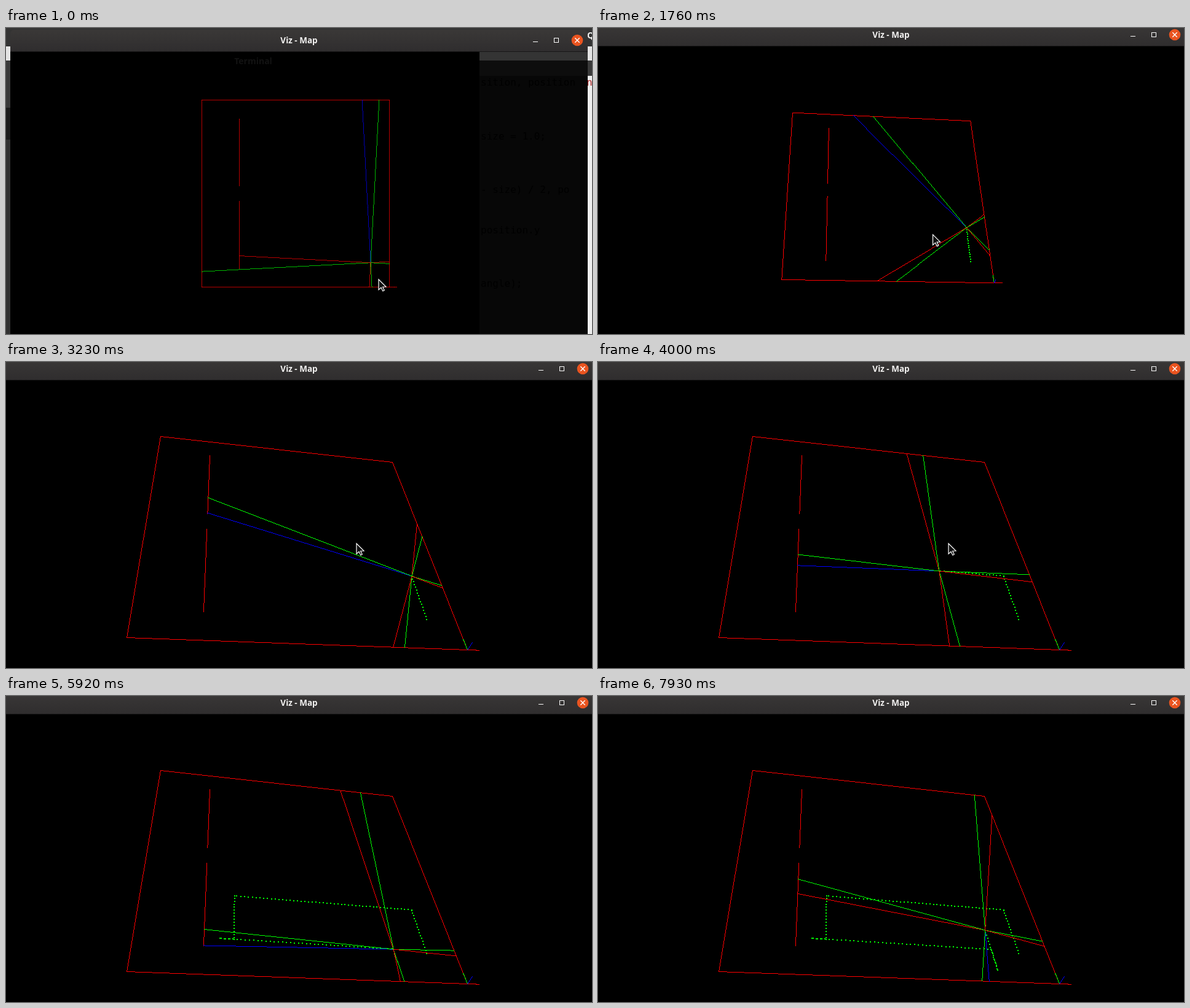
Write an HTML page with a canvas that moves like this. It is 953 px wide and 499 px high and loops after 8000 ms.

```html
<!DOCTYPE html>
<html lang="en">
<head>
<meta charset="utf-8">
<title>Viz - Map</title>
<style>
html, body { margin: 0; width: 100%; height: 100%; overflow: hidden; background: #000; }
canvas { display: block; }
</style>
</head>
<body>
<canvas id="stage" width="953" height="499"></canvas>
<script>
const ctx = document.getElementById('stage').getContext('2d');
const W = 953, H = 499, LOOP = 8000;
const RED = '#f00', GREEN = '#0f0', BLUE = '#00f';

// time, map x, map y, heading in degrees
const pose = [
  [-36, .9, .89, 0], [300, .9, .7, 0], [900, .9, .7, 36], [2690, .9, .7, 36],
  [3590, .9, .7, 89], [4660, .2925, .689, 89], [4975, .289, .871, 89],
  [5055, .2476, .869, 89], [5950, .8085, .878, 89], [6930, .8085, .878, 155],
  [7290, .809, .878, 180], [7430, .81, .958, 180], [7710, .808, .797, 180], [7930, .808, .797, 166]
];

// time, map corners clockwise from top left, tip of the upright axis
const camera = [
  [760, 318, 108, 623, 108, 623, 413, 318, 413, 0, 0],
  [1220, 318.5, 117, 619, 121, 631, 424, 307, 425, 0, 0],
  [1600, 316, 131, 610, 141, 641, 420, 297, 418, 2, -4],
  [2370, 316, 163, 587, 190, 654, 397, 303, 379, 5, -9],
  [2690, 316, 163, 587, 190, 654, 397, 303, 379, 5, -9],
  [3000, 251, 121, 628, 163, 750, 469, 196, 449, 8, -12]
];

const mouse = [[0, 606, 401], [760, 606, 401], [1220, 522, 373], [2370, 570, 296]];

// vertical shift, side margin and brightness while the window opens
const opening = [[0, 9, 7, .7], [80, 9, 7, .7], [300, 0, 0, 1]];

const walls = [
  [0, 0, 1, 0], [1, 0, 1, 1], [1, 1, 0, 1], [0, 1, 0, 0],
  [.2, .1, .2, .46], [.2, .54, .2, .9]
];
const sensors = [
  [93, BLUE], [87, GREEN], [3, RED], [-3, GREEN],
  [273, GREEN], [267, RED], [183, GREEN], [177, RED]
];

function at(keys, t) {
  const last = keys[keys.length - 1];
  if (t <= keys[0][0]) return keys[0].slice(1);
  if (t >= last[0]) return last.slice(1);
  const i = keys.findIndex(k => k[0] > t), a = keys[i - 1], b = keys[i];
  const p = (t - a[0]) / (b[0] - a[0]);
  return a.slice(1).map((v, j) => v + (b[j + 1] - v) * p);
}

// The picture refreshes in steps of about 77 ms.
function stepped(t) {
  if (t < 78) return 0;
  if (t < 756) return Math.min(610, 80 + Math.floor((t - 78) / 75.7) * 75.7);
  const base = t < 2686 ? 760 : 2690;
  return base + Math.floor((t - base + 6) / 76.9) * 76.9;
}

function projector([x0, y0, x1, y1, x2, y2, x3, y3]) {
  const ax = x1 - x2, bx = x3 - x2, sx = x0 - x1 + x2 - x3;
  const ay = y1 - y2, by = y3 - y2, sy = y0 - y1 + y2 - y3;
  const det = ax * by - bx * ay;
  const g = (sx * by - bx * sy) / det, h = (ax * sy - sx * ay) / det;
  return (u, v) => {
    const w = 1 + g * u + h * v;
    return [
      (x0 + (x1 - x0 + g * x1) * u + (x3 - x0 + h * x3) * v) / w,
      (y0 + (y1 - y0 + g * y1) * u + (y3 - y0 + h * y3) * v) / w
    ];
  };
}

// Distance from a point to the nearest wall along a unit direction.
function range(u, v, du, dv) {
  let best = 2;
  for (const [a, b, c, d] of walls) {
    const ex = c - a, ey = d - b, cross = du * ey - dv * ex;
    if (Math.abs(cross) < 1e-9) continue;
    const dist = ((a - u) * ey - (b - v) * ex) / cross;
    const along = ((a - u) * dv - (b - v) * du) / cross;
    if (dist > 1e-6 && along >= 0 && along <= 1) best = Math.min(best, dist);
  }
  return best;
}

// Hard-edged line, one pixel wide.
function line([x0, y0], [x1, y1], color) {
  const n = Math.max(1, Math.ceil(Math.max(Math.abs(x1 - x0), Math.abs(y1 - y0))));
  ctx.fillStyle = color;
  for (let i = 0; i <= n; i++) {
    ctx.fillRect(Math.round(x0 + (x1 - x0) * i / n), Math.round(y0 + (y1 - y0) * i / n), 1, 1);
  }
}

function box(x, y, w, h, color) {
  ctx.fillStyle = color;
  ctx.fillRect(x, y, w, h);
}

function label(text, x, y, color, font, align = 'left') {
  ctx.font = font;
  ctx.textAlign = align;
  ctx.textBaseline = 'middle';
  ctx.fillStyle = color;
  ctx.fillText(text, x, y);
}

function drawTrail(t, project) {
  ctx.fillStyle = GREEN;
  for (let i = 1; i < pose.length && pose[i - 1][0] < t; i++) {
    const [ta, ua, va] = pose[i - 1], [tb, ub, vb] = pose[i];
    const length = Math.hypot(ub - ua, vb - va);
    if (length < .01) continue;
    const done = Math.min(1, (t - ta) / (tb - ta)) * length;
    for (let s = 0; s <= done; s += .0125) {
      const [x, y] = project(ua + (ub - ua) * s / length, va + (vb - va) * s / length);
      ctx.fillRect(Math.round(x) - 1, Math.round(y) - 1, 2, 2);
    }
  }
}

function drawMap(t) {
  const view = at(camera, t), project = projector(view);
  const [u, v, heading] = at(pose, t);
  const here = project(u, v);
  for (const [a, b, c, d] of walls) line(project(a, b), project(c, d), RED);
  drawTrail(t, project);
  for (const [offset, color] of sensors) {
    const angle = (offset + heading) * Math.PI / 180;
    const du = Math.cos(angle), dv = -Math.sin(angle), dist = range(u, v, du, dv);
    if (color === BLUE && dist < .1) continue;
    line(here, project(u + du * dist, v + dv * dist), color);
  }
  const origin = project(1, 1), [zx, zy] = view.slice(8);
  line(origin, project(1.04, 1), RED);
  if (zy < -3) {
    line(origin, project(1, .96), GREEN);
    line(origin, [origin[0] + zx, origin[1] + zy], BLUE);
  }
}

function drawPointer(x, y) {
  ctx.beginPath();
  [[0, 0], [0, 17], [4, 13.3], [6.8, 19], [9.3, 17.8], [6.7, 12.2], [12, 12]]
    .forEach(([px, py]) => ctx.lineTo(x + px, y + py));
  ctx.closePath();
  ctx.fillStyle = '#111';
  ctx.fill();
  ctx.strokeStyle = '#fff';
  ctx.lineWidth = 1.2;
  ctx.stroke();
}

function drawDesktop() {
  box(0, 0, W, H, '#333');
  box(0, 30, W, 23, '#e4e4e4');
  box(0, 53, W, 77, '#3a3a3a');
  box(0, 130, 7, 52, '#1c1c1c');
  box(946, 78, 7, H, '#eee');
  label('Q', 945, 13, '#eee', 'bold 14px "Open Sans", sans-serif');
  label('n', 944, 90, '#a22', '16px "DejaVu Sans Mono", monospace');
}

function drawGhosts() {
  box(770, 39, 176, 14, '#343434');
  box(770, 53, 176, 25, '#0d0d0d');
  box(770, 78, 176, H, '#070707');
  label('Terminal', 402, 55, '#121212', 'bold 14px "Open Sans", sans-serif', 'center');
  const font = '16px "DejaVu Sans Mono", monospace';
  [['sition, position', 90], ['size = 1.0;', 178], ['- size) / 2, po', 265], ['position.y', 331], ['angle);', 418]]
    .forEach(([text, y]) => label(text, 772, y, '#000', font));
}

function drawTitleBar(dy, margin) {
  const shade = ctx.createLinearGradient(0, dy - 6, 0, dy + 30);
  shade.addColorStop(0, '#3a3837');
  shade.addColorStop(1, '#2f2d2e');
  ctx.fillStyle = shade;
  ctx.beginPath();
  ctx.roundRect(margin, dy - 6, W - 2 * margin, 35.5, [6, 6, 0, 0]);
  ctx.fill();
  label('Viz - Map', 476.5, 12 + dy, '#f2f1f0', 'bold 13.5px "Open Sans", sans-serif', 'center');
  const dx = -Math.round(margin * 1.3), y = Math.round(dy);
  box(866 + dx, 13 + y, 8, 1, '#fff');
  ctx.lineWidth = 1;
  ctx.strokeStyle = '#fff';
  ctx.strokeRect(900.5 + dx, 7.5 + y, 7, 7);
  ctx.fillStyle = '#e95420';
  ctx.beginPath();
  ctx.arc(938 + dx, 11 + y, 9.3, 0, 7);
  ctx.fill();
  ctx.lineWidth = 1.4;
  ctx.beginPath();
  for (const s of [-1, 1]) {
    ctx.moveTo(934.3 + dx, 11 + y - 3.7 * s);
    ctx.lineTo(941.7 + dx, 11 + y + 3.7 * s);
  }
  ctx.stroke();
}

function draw(t) {
  const [dy, margin, glow] = at(opening, t);
  box(0, 0, W, H, '#000');
  if (margin > 0) {
    drawDesktop();
    box(margin, dy, W - 2 * margin, H, '#000');
    if (t < 80) drawGhosts();
  }
  ctx.save();
  ctx.translate(0, Math.round(dy));
  ctx.globalAlpha = glow;
  drawMap(t);
  ctx.restore();
  drawTitleBar(dy, margin);
  if (t < 4400) {
    const [x, y] = at(mouse, t);
    drawPointer(x, y + dy);
  }
}

const start = performance.now();
function frame() {
  draw(stepped((performance.now() - start) % LOOP));
  requestAnimationFrame(frame);
}
frame();
</script>
</body>
</html>
```
